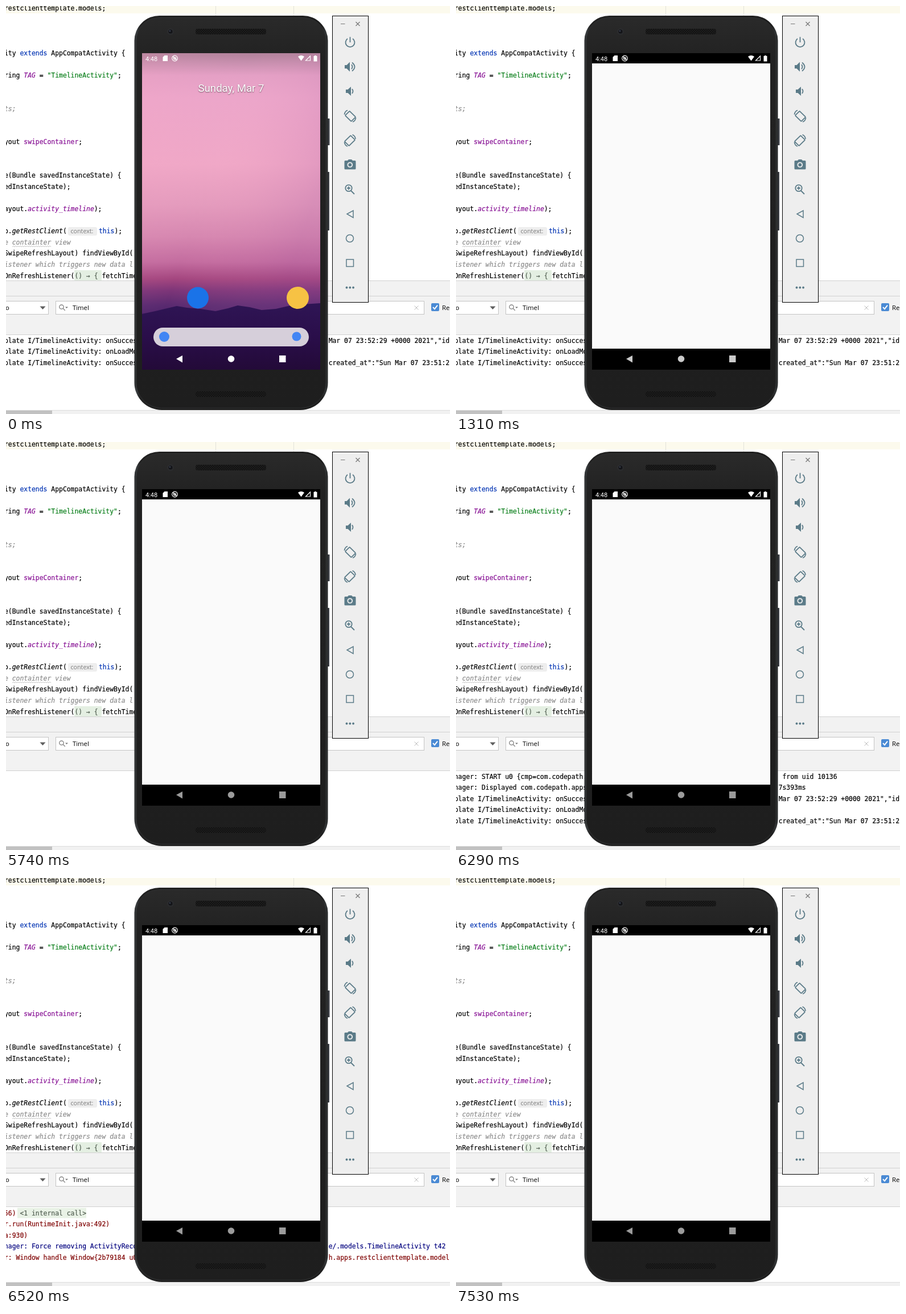
An HTML page for the animation above (8 s loop, 780 px wide and 718 px high).

```html
<!DOCTYPE html>
<html lang="en">
<head>
<meta charset="utf-8">
<title>Emulator and log</title>
<style>
html, body { margin: 0; width: 100%; height: 100%; overflow: hidden; background: #fff; }
svg { display: block; width: 780px; height: 718px; }
text { white-space: pre; }
.mono { font: 11.4px "DejaVu Sans Mono", "Liberation Mono", monospace; color: #000; }
.mono text, .mono tspan { fill: currentColor; stroke: currentColor; stroke-width: .2; }
.ui { font: 11.3px "Open Sans", "Noto Sans", sans-serif; fill: #000; }
.phone-text { font-family: Roboto, "Noto Sans", sans-serif; fill: #fff; }
.kw { color: #0033b3; }
.field { color: #871094; }
.str { color: #067d17; }
.note { color: #8c8c8c; font-style: italic; }
.it { font-style: italic; }
.warn { color: #00007f; }
.err { color: #7f0000; }
.fold { color: #536053; }
.line { fill: none; stroke: #5b7b88; stroke-width: 1.8; }
.solid { fill: #5b7b88; }

#home { animation: home 8s step-end infinite; }
#nav { fill: #fff; animation: nav 8s step-end infinite; }
#pages { animation: pages 8s step-end infinite; }
@keyframes home {
  0% { visibility: visible; }
  2.875%, 100% { visibility: hidden; }
}
@keyframes nav {
  0% { fill: #fff; }
  16.375% { fill: #cbcbcb; }
  23.625%, 100% { fill: #9b9b9b; }
}
@keyframes pages {
  0% { transform: translateY(0); }
  71.75% { transform: translateY(-200px); }
  78.625% { transform: translateY(-400px); }
  79.5% { transform: translateY(-600px); }
  80.5% { transform: translateY(-800px); }
  81.5% { transform: translateY(-1000px); }
  92% { transform: translateY(-1200px); }
  93% { transform: translateY(-1400px); }
  94.125%, 100% { transform: translateY(-200px); }
}
</style>
</head>
<body>
<svg viewBox="0 0 780 718" width="780" height="718">
  <defs>
    <linearGradient id="sky" x1="0" y1="0" x2="0" y2="1">
      <stop offset="0" stop-color="#b0829a"/>
      <stop offset=".03" stop-color="#c78fae"/>
      <stop offset=".07" stop-color="#e4a0c5"/>
      <stop offset=".14" stop-color="#eca6ca"/>
      <stop offset=".35" stop-color="#f0a8c7"/>
      <stop offset=".48" stop-color="#e49bbd"/>
      <stop offset=".58" stop-color="#d687b0"/>
      <stop offset=".66" stop-color="#c36c9f"/>
      <stop offset=".713" stop-color="#a4467f"/>
      <stop offset=".75" stop-color="#7d3578"/>
      <stop offset=".795" stop-color="#5a2a70"/>
      <stop offset=".84" stop-color="#4a2268"/>
    </linearGradient>
    <linearGradient id="dusk" x1="0" y1="0" x2="1" y2=".5">
      <stop offset="0" stop-color="#ffa6c0" stop-opacity=".15"/>
      <stop offset=".5" stop-color="#f0a0c4" stop-opacity="0"/>
      <stop offset="1" stop-color="#a458a0" stop-opacity=".2"/>
    </linearGradient>
    <linearGradient id="hill" x1="0" y1="0" x2="0" y2="1">
      <stop offset="0" stop-color="#2f1555"/>
      <stop offset=".5" stop-color="#2a0e4a"/>
      <stop offset="1" stop-color="#230a38"/>
    </linearGradient>
    <linearGradient id="shell" x1="0" y1="0" x2="1" y2="0">
      <stop offset="0" stop-color="#2b2d2e"/>
      <stop offset=".012" stop-color="#3b3e40"/>
      <stop offset=".03" stop-color="#222"/>
      <stop offset=".97" stop-color="#1e1e1e"/>
      <stop offset=".988" stop-color="#343738"/>
      <stop offset="1" stop-color="#242525"/>
    </linearGradient>
    <linearGradient id="face" x1="0" y1="0" x2="0" y2="1">
      <stop offset="0" stop-color="#2a2a2a"/>
      <stop offset=".1" stop-color="#222"/>
      <stop offset="1" stop-color="#1e1e1e"/>
    </linearGradient>
    <pattern id="mesh" width="4" height="4" patternUnits="userSpaceOnUse">
      <rect width="4" height="4" fill="#121212"/>
      <circle cx="1" cy="1" r=".8" fill="#2a2a2a"/>
      <circle cx="3" cy="3" r=".8" fill="#2a2a2a"/>
    </pattern>
    <clipPath id="logClip"><rect y="579" width="780" height="132"/></clipPath>
  </defs>

  <!-- editor -->
  <rect width="780" height="718" fill="#fff"/>
  <rect width="780" height="13" fill="#fcfaed"/>
  <path d="M368.5 0V17M505.5 0V17" stroke="#e3e3dc"/>
  <rect x="120" y="465" width="48" height="18" fill="#e4efe2"/>
  <rect x="109" y="389" width="51" height="15" rx="3" fill="#eee"/>
  <text class="ui" x="113.5" y="400" style="font-size:10.7px;fill:#7a7a7a">context:</text>
  <path id="wave" fill="none" stroke="#bdbdbd" stroke-width=".9"/>
  <g class="mono">
    <text x="-3" y="8">restclienttemplate.models;</text>
    <text x="-3" y="86.5">ity <tspan class="kw">extends</tspan> AppCompatActivity {</text>
    <text x="-3" y="125.7">ring <tspan class="field it">TAG</tspan> = <tspan class="str">"TimelineActivity"</tspan>;</text>
    <text x="-3" y="184.5" class="note">ts;</text>
    <text x="-3" y="243.3">yout <tspan class="field">swipeContainer</tspan>;</text>
    <text x="-3" y="302.1">e(Bundle savedInstanceState) {</text>
    <text x="-3" y="321.7">edInstanceState);</text>
    <text x="-3" y="360.9">ayout.<tspan class="field it">activity_timeline</tspan>);</text>
    <text x="-3" y="400.1">o.<tspan class="it">getRestClient</tspan>(<tspan class="kw" x="163">this</tspan>);</text>
    <text x="-3" y="419.7" class="note">e containter view</text>
    <text x="-3" y="439.3">SwipeRefreshLayout) findViewById(</text>
    <text x="-3" y="458.9" class="note">istener which triggers new data l</text>
    <text x="-3" y="478.5">OnRefreshListener(<tspan class="fold">() → { </tspan>fetchTime</text>
  </g>

  <!-- log toolbar -->
  <rect y="483" width="780" height="96" fill="#f2f2f2"/>
  <path d="M0 483.5H780M0 510.5H780M0 578.5H780" stroke="#d1d1d1"/>
  <g fill="#fff" stroke="#c4c4c4">
    <rect x="-9.500" y="519.500" width="84" height="23"/>
    <rect x="87.500" y="519.500" width="647" height="23"/>
  </g>
  <path d="M59.500 528.500h10l-5 5.500z" fill="#5f5f5f"/>
  <g fill="none" stroke="#727272" stroke-width="1.2">
    <circle cx="97.500" cy="529.500" r="3.700"/>
    <path d="M100.300 532.300l3.500 3.500"/>
  </g>
  <path d="M104 529.500h5l-2.500 2.500z" fill="#727272"/>
  <path d="M717.500 527.500l7 7m0-7l-7 7" stroke="#bcbcbc"/>
  <g class="ui">
    <text x="-1" y="535">o</text>
    <text x="117" y="535">Timel</text>
    <text x="766" y="535">Re</text>
  </g>
  <rect x="747" y="523" width="14" height="14" rx="2" fill="#4a8ad4"/>
  <path d="M750 530l3 3.200 5-6.500" fill="none" stroke="#fff" stroke-width="1.900"/>

  <!-- log -->
  <g clip-path="url(#logClip)"><g class="mono" id="pages"></g></g>
  <rect y="711" width="780" height="7" fill="#f1f1f1"/>
  <path d="M0 711.500H780" stroke="#dcdcdc"/>
  <rect y="712" width="81" height="6" fill="#c1c1c1"/>

  <!-- phone body -->
  <path d="M564 198h4.500v47h-4.500zM564 292h4v103h-4z" fill="#3a3d43"/>
  <path d="M225.500 61A44 44 0 0 1 269.500 17H521.500A44 44 0 0 1 565.500 61V663A48 48 0 0 1 517.500 711H273.500A48 48 0 0 1 225.500 663Z" fill="url(#shell)"/>
  <path d="M229 61A40.500 40.500 0 0 1 269.500 20.500H521.500A40.500 40.500 0 0 1 562 61V663A44.500 44.500 0 0 1 517.500 707.500H273.500A44.500 44.500 0 0 1 229 663Z" fill="url(#face)" stroke="#2d2e2f"/>
  <rect x="333" y="40" width="124" height="10" rx="4" fill="url(#mesh)"/>
  <rect x="333" y="678" width="124" height="10" rx="4" fill="url(#mesh)"/>
  <circle cx="289" cy="45" r="6" fill="#2b2c2e"/>
  <circle cx="289" cy="45" r="3.600" fill="#141519"/>
  <circle cx="288" cy="44" r="1.300" fill="#3a4252"/>

  <!-- blank app screen -->
  <rect x="239" y="83" width="313" height="557" fill="#000"/>
  <rect x="239" y="101" width="313" height="502" fill="#fafafa"/>

  <!-- home screen -->
  <g id="home">
    <rect x="239" y="83" width="313" height="557" fill="url(#sky)"/>
    <rect x="239" y="83" width="313" height="457" fill="url(#dusk)"/>
    <path d="M239 542L262 537 283 532 300 528 318 531 342 533 368 537 390 532 407 527 428 530 449 535 474 533 500 527 522 525 552 523V640H239Z" fill="url(#hill)"/>
    <text class="phone-text" x="395.500" y="151" text-anchor="middle" style="font-size:18.600px;text-shadow:0 1px 2px #0008">Sunday, Mar 7</text>
    <circle cx="337" cy="513.500" r="19" fill="#1a73e8"/>
    <circle cx="512.500" cy="513.500" r="19.500" fill="#f6c244"/>
    <rect x="259" y="566" width="273" height="33" rx="16.500" fill="#d6cfda"/>
    <circle cx="278" cy="582" r="9" fill="#4285f4"/>
    <circle cx="510.500" cy="581.500" r="8" fill="#4285f4"/>
  </g>

  <!-- status bar and navigation -->
  <g fill="#fff">
    <text class="phone-text" x="245" y="96.500" font-size="11">4:48</text>
    <path d="M278.500 87H284V97H275.500V90Z"/>
    <path d="M513 89Q518.500 85 524 89L518.500 96.500Z"/>
    <path d="M542 88V87h3v1h1.500v9.500h-6V88z"/>
  </g>
  <g fill="none" stroke="#fff" stroke-width="1.200">
    <circle cx="296.500" cy="92" r="4.800"/>
    <path d="M293 88.500l7 7"/>
    <circle cx="296.500" cy="92" r="2"/>
    <path d="M526.500 96H534.500V88Z"/>
  </g>
  <g id="nav">
    <path d="M299 621L310 615V627.500Z"/>
    <circle cx="395.500" cy="621" r="5.800"/>
    <rect x="480" y="615" width="11.500" height="12"/>
  </g>

  <!-- emulator controls -->
  <rect x="573.500" y="17.500" width="63" height="504" fill="#eee" stroke="#000"/>
  <path d="M588 31.500h7.500M614.500 28l7 7m0-7l-7 7" stroke="#777" stroke-width="1.200"/>
  <g class="line">
    <path d="M604.500 54.500V64M600 57.500A8 8 0 1 0 609 57.500"/>
    <path d="M607 103Q610 107 607 111M608 99.500Q617 107 608 114.500M608 146Q611 150 608 154"/>
    <rect x="-5.500" y="-7.500" width="11" height="15" rx="1" transform="translate(605 194) rotate(-45)"/>
    <path d="M594.500 191Q595 185.500 600 183.500M614.500 196.500Q614 202 609 204"/>
    <rect x="-5.500" y="-7.500" width="11" height="15" rx="1" transform="translate(604 237) rotate(45)"/>
    <path d="M614 234Q613.500 228.500 608.500 226.500M594.500 239.500Q595 245 600 247"/>
    <circle cx="602" cy="320.500" r="5.700"/>
    <path d="M606 325l6 6M599 320.500h6M602 317.500v6"/>
    <path d="M610 360V372.500L599 366Z" stroke-width="1.500"/>
    <circle cx="604" cy="409" r="6.500" stroke-width="1.500"/>
    <rect x="598" y="446" width="12.500" height="12.500" stroke-width="1.500"/>
  </g>
  <g class="solid">
    <path d="M595 104h3.500l5.500-5.500v17l-5.500-5.500H595zM597 147h3.500l5.500-5v16l-5.500-5H597z"/>
    <path d="M596 272h4l2-2h5l2 2h4q1.500 0 1.500 1.500v12.500q0 1.500-1.500 1.500h-17q-1.500 0-1.500-1.500v-12.500q0-1.500 1.500-1.500z"/>
    <circle cx="598.500" cy="495.500" r="1.900"/>
    <circle cx="604.300" cy="495.500" r="1.900"/>
    <circle cx="610.100" cy="495.500" r="1.900"/>
  </g>
  <circle cx="604.300" cy="279.500" r="3.900" fill="#5b7b88" stroke="#eee" stroke-width="1.900"/>
</svg>
<script>
const NS = "http://www.w3.org/2000/svg";
const CHAR = 6.863, ROW = 19.6, LEFT = -3, PAGE = 200;
const pagesEl = document.getElementById("pages");

function add(tag, attrs, text = "") {
  const el = document.createElementNS(NS, tag);
  for (const key in attrs) el.setAttribute(key, attrs[key]);
  el.textContent = text;
  pagesEl.append(el);
}

// Rows hold: level class, text left of the phone, text right of it, column of the right part.
const removing = id => ["warn", "nager: Force removing ActivityReco", "e/.models.TimelineActivity " + id + " f"];
const handle = id => ["err", "r: Window handle Window{" + id + " u0", "h.apps.restclienttemplate.models"];
const start = ["", "nager: START u0 {cmp=com.codepath.", " from uid 10136"];
const shown = ["", "nager: Displayed com.codepath.apps", "7s393ms"];
const loaded = ["", ' jsonObject=null, jsonArray=[{"crea', '1368708630346928137,"id_str":"136', 81];
const more = ["", " for loadMoreData jsonObject=null,", '000 2021","id":1368707068660772'];
const success = ["", "plate I/TimelineActivity: onSucces", 'Mar 07 23:52:29 +0000 2021","id'];
const older = ["", "plate I/TimelineActivity: onSucces", 'created_at":"Sun Mar 07 23:51:26'];
const loadMore = ["", "plate I/TimelineActivity: onLoadMo"];
const trace = [
  ["err", "56) "],
  ["err", "r.run(RuntimeInit.java:492)"],
  ["err", "a:930)"]
];

const pages = [
  [592.5, [success, loadMore, older]],
  [592.5, []],
  [592.5, [start, shown, success, loadMore, older]],
  [583, [["", "e: 5"], more, removing("t41"), handle("6321825"), start, shown, loaded]],
  [593.5, [removing("t41"), handle("6321825"), start, shown, loaded]],
  [593.5, [...trace, removing("t42"), handle("2b79184")]],
  [583, [trace[2], removing("t42"), handle("2b79184"), start, shown, loaded]],
  [593.5, [...trace, removing("t43"), handle("2b79184")]]
];

pages.forEach(([top, rows], page) => rows.forEach(([level, left, right = "", col = 83], i) => {
  const y = top + page * PAGE + i * ROW;
  add("text", { x: LEFT, y, class: level }, left);
  if (right) add("text", { x: LEFT + col * CHAR, y, class: level }, right);
  if (left === trace[0][1]) {
    add("rect", { x: 20, y: y - 13, width: 121, height: 18, fill: "#e9f2e6" });
    add("text", { x: LEFT + 4 * CHAR, y, class: "fold" }, "<1 internal call>");
  }
}));

// Spelling underline
let wave = "M11 424";
for (let x = 13; x <= 79; x += 2) wave += `L${x} ${x % 4 === 1 ? 422 : 424}`;
document.getElementById("wave").setAttribute("d", wave);
</script>
</body>
</html>
```
